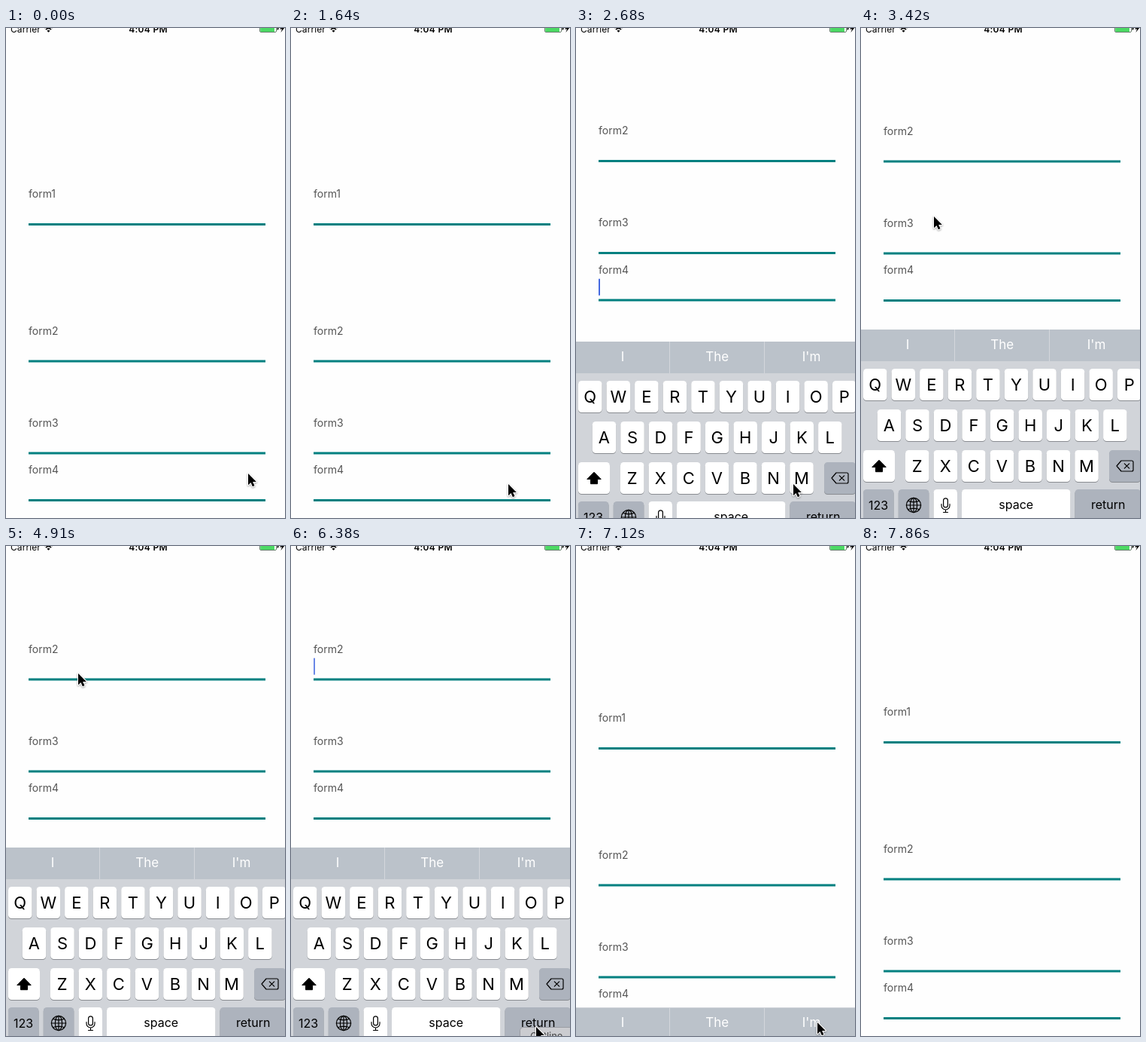
Write an HTML page that moves like this. It is 371x650 px and loops after 8.16 s.

```html
<!DOCTYPE html>
<html lang="en">
<head>
<meta charset="utf-8">
<title>Form with keyboard</title>
<style>
  html, body { margin: 0; width: 100%; height: 100%; overflow: hidden; background: #fefefe; }
  svg { display: block; width: 371px; height: 650px; font-family: Inter, Roboto, sans-serif; }
  .label { font-size: 14px; fill: #555; }
  .hint { font-size: 17px; fill: #fff; text-anchor: middle; }
  .letter { font-size: 22px; text-anchor: middle; }
  .word { font-size: 16px; text-anchor: middle; }
  .icon { fill: none; stroke: #000; stroke-width: 1.2; stroke-linejoin: round; stroke-linecap: round; }
</style>
</head>
<body>
<svg id="stage" viewBox="0 0 371 650">
  <rect width="371" height="650" fill="#fefefe"/>
  <g id="form"></g>

  <g id="status">
    <text x="6" y="5.5" font-size="12" letter-spacing=".1">Carrier</text>
    <g fill="none" stroke="#000" stroke-width="1.8">
      <path d="M53 2.1a5 5 0 0 1 7 0"/>
      <path d="M50.8 -.2a8 8 0 0 1 11.4 0"/>
    </g>
    <path d="M56.5 5.8l-2-2.1a2.9 2.9 0 0 1 4 0z"/>
    <text x="189" y="5.5" font-size="12" font-weight="600" letter-spacing=".3" text-anchor="middle">4:04 PM</text>
    <rect x="337.5" y="-4.5" width="22" height="10" rx="1.5" fill="#fff" stroke="#3d5c44" stroke-width=".8"/>
    <rect x="338.3" y="-4" width="18.7" height="9" fill="#4cd964"/>
    <path d="M360.6 -1.2a2 2 0 0 1 0 4z"/>
    <path d="M369 -5l-5 6.5h3l-1.6 4.5 5.2-6.6h-3.2z"/>
  </g>

  <g id="keyboard">
    <rect width="371" height="270" fill="#d1d4d9"/>
    <rect width="371" height="42" fill="#bbc2ca"/>
    <path d="M124.5 0v42M250.5 0v42" stroke="#d3d7dc"/>
    <text class="hint" x="62" y="25.5">I</text>
    <text class="hint" x="187.7" y="25.5">The</text>
    <text class="hint" x="313" y="25.5">I'm</text>
    <g id="keys"></g>
    <path d="M24 173.2l9.2 9.3h-4.7v6.2h-9v-6.2h-4.700z" stroke="#000" stroke-linejoin="round"/>
    <path class="icon" d="M346 174h14a2 2 0 0 1 2 2v10a2 2 0 0 1-2 2h-14l-6-7zM350.300 177.800l6.400 6.400M356.700 177.800l-6.400 6.400"/>
    <g class="icon">
      <circle cx="70" cy="233" r="9.600"/>
      <ellipse cx="70" cy="233" rx="4.600" ry="9.600"/>
      <path d="M70 223.400v19.200M60.400 233h19.200M62.500 227.300q7.500 3 15 0M62.500 238.700q7.500-3 15 0"/>
      <rect x="109.600" y="223.800" width="5.800" height="12" rx="2.900"/>
      <path d="M107 231.500v2a5.500 5.500 0 0 0 11 0v-2M112.500 239v3.500M109.500 242.500h6"/>
    </g>
  </g>

  <g id="tip">
    <rect x="304.500" y="638.500" width="80" height="24" rx="4" fill="#cbccd0" stroke="#9b9da3"/>
    <text x="318" y="655" font-size="13" fill="#444">Outline</text>
  </g>

  <g id="cursor">
    <path d="M0 0v15.200l3.500-3.200 2.400 5.200 2.600-1.200-2.400-5.100h4.800z"
      stroke="#fff" stroke-width="2.200" stroke-linejoin="round" paint-order="stroke"
      style="filter: drop-shadow(0 1px 1px rgba(0,0,0,.35))"/>
  </g>
</svg>

<script>
const LOOP = 8160;
const LINES = [260.5, 442, 564, 626.5];
const $ = id => document.getElementById(id);

function add(parent, tag, attrs, text) {
  const el = document.createElementNS("http://www.w3.org/2000/svg", tag);
  for (const k in attrs) el.setAttribute(k, attrs[k]);
  if (text) el.textContent = text;
  parent.appendChild(el);
  return el;
}

// Form fields
LINES.forEach((y, i) => {
  add($("form"), "text", { class: "label", x: 30, y: y - 35.5 }, "form" + (i + 1));
  add($("form"), "rect", { x: 30, y: y - 1.5, width: 315, height: 3, fill: "#008080" });
});
const caret = add($("form"), "rect", { x: 30, width: 2, height: 22, fill: "#4569e0" });

// Keys
function key(x, y, w, fill = "#fff") {
  const box = { x, width: w, height: 42, rx: 4.6 };
  add($("keys"), "rect", { ...box, y: y + 1, fill: "#898c91" });
  add($("keys"), "rect", { ...box, y, fill });
}
const GRAY = "#adb3bd";
[["QWERTYUIOP", 3, 52], ["ASDFGHJKL", 21.7, 106], ["ZXCVBNM", 59, 160]].forEach(([row, x0, y]) => {
  [...row].forEach((ch, i) => {
    const x = x0 + i * 37.55;
    key(x, y, 31.5);
    add($("keys"), "text", { class: "letter", x: x + 15.75, y: y + 29 }, ch);
  });
});
key(3, 160, 42);
key(330, 160, 42, GRAY);
key(3, 212, 40.5, GRAY);
key(49.8, 212, 40.5, GRAY);
key(96.5, 212, 31.5);
key(134, 212, 144.5);
key(284.5, 212, 87.5, GRAY);
[["123", 23, 239], ["space", 206.2, 238], ["return", 328.7, 238]].forEach(([s, x, y]) =>
  add($("keys"), "text", { class: "word", x, y }, s));

// Steps: [start ms, values...]
const cursorSteps = [
  [0, 322, 591], [1200, 319, 593], [1350, 308, 598], [1490, 295, 603], [1640, 289, 605],
  [2830, 282, 588], [2980, 230, 480], [3120, 160, 350], [3270, 110, 266], [3420, 97, 250],
  [3570, 96, 275], [3710, 96, 285], [4610, 96, 262], [4760, 96, 195], [4910, 96, 169],
  [5800, 130, 235], [5940, 258, 500], [6090, 326, 638], [6530, 325, 636], [6680, 323, 634],
  [6820, 321, 632], [7710, 321, 641], [7860, 321, 680]
];
const scrollSteps = [[0, 0], [2530, 233], [2680, 265.5], [2830, 265], [7120, -8], [7270, 0]];
const keyboardSteps = [[0, 660], [2530, 523], [2680, 416], [2830, 400], [7120, 612.5], [7270, 655]];
// Caret: field index, opacity
const caretSteps = [
  [0, 3, 0], [2680, 3, 1], [3270, 3, 0], [3570, 3, 1], [4010, 2, 1], [4610, 2, 0],
  [5200, 2, 1], [5350, 1, 1], [5940, 1, 0], [6380, 1, .8], [6530, 1, 1], [6970, 1, 0]
];

const at = (steps, t) => steps.findLast(s => s[0] <= t).slice(1);
const move = (id, x, y) => $(id).setAttribute("transform", `translate(${x} ${y})`);

function draw(t) {
  const [field, alpha] = at(caretSteps, t);
  move("form", 0, -at(scrollSteps, t)[0]);
  move("keyboard", 0, at(keyboardSteps, t)[0]);
  move("cursor", ...at(cursorSteps, t));
  caret.setAttribute("y", LINES[field] - 28.3);
  caret.setAttribute("opacity", alpha);
  $("tip").setAttribute("visibility", t >= 6090 && t < 6530 ? "visible" : "hidden");
}

const start = performance.now();
function tick() {
  draw((performance.now() - start) % LOOP);
  requestAnimationFrame(tick);
}
tick();
</script>
</body>
</html>
```
